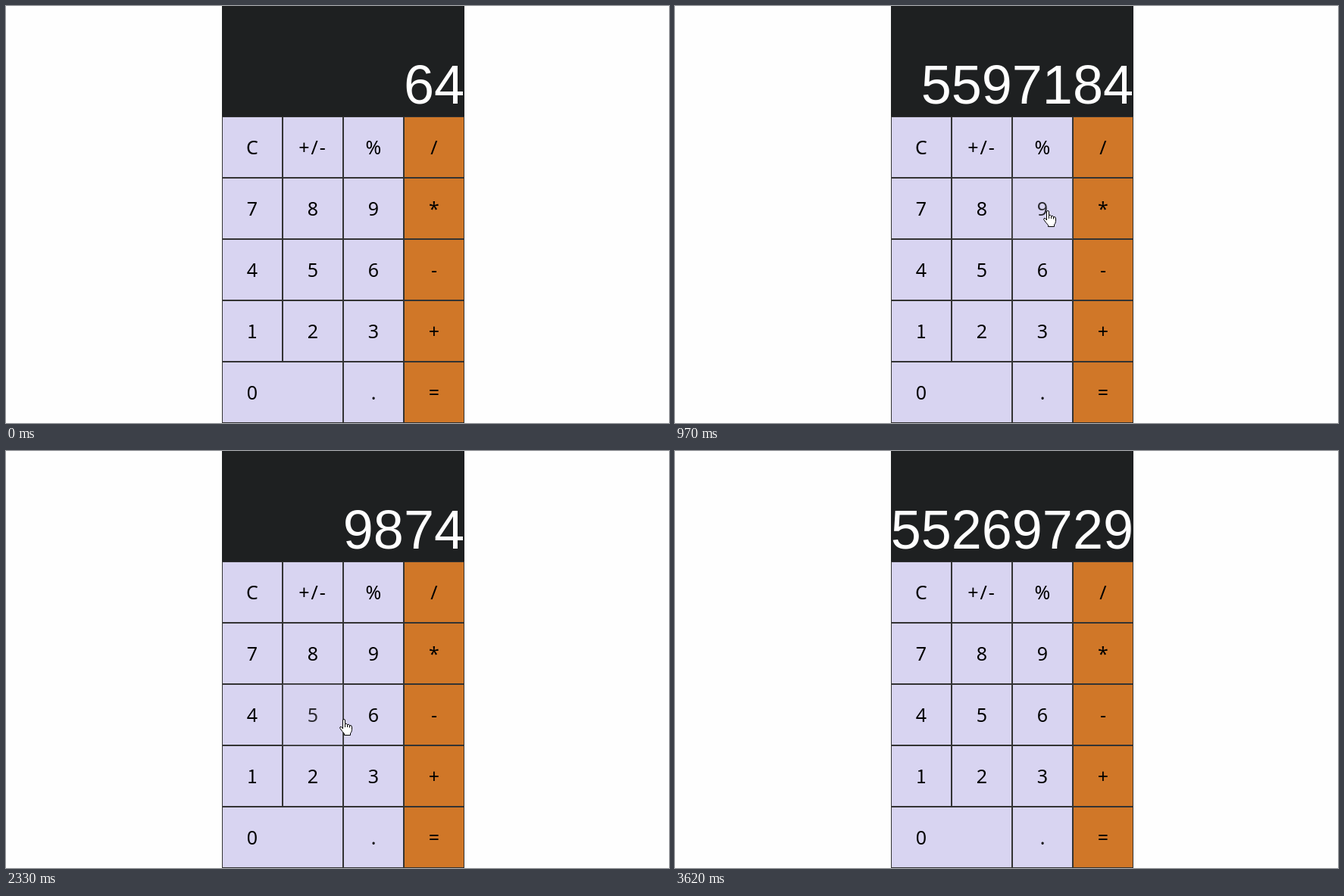
An HTML page with a canvas that plays this animation: 875 by 551 pixels, repeating every 4.12 s.

```html
<!DOCTYPE html>
<html lang="en">
<head>
<meta charset="utf-8">
<title>Calculator</title>
<style>
  html, body { margin: 0; width: 100%; height: 100%; overflow: hidden; background: #fefefe; }
  canvas { display: block; }
</style>
</head>
<body>
<canvas id="stage" width="875" height="551"></canvas>
<script>
const ctx = document.getElementById('stage').getContext('2d');
const LOOP = 4120, LEFT = 285, TOP = 146, CELL_W = 80, CELL_H = 81;
const LAVENDER = '#d8d4f1', ORANGE = '#d07728';

const ROWS = [
  ['C', '+/-', '%', '/'],
  ['7', '8', '9', '*'],
  ['4', '5', '6', '-'],
  ['1', '2', '3', '+'],
  ['0', null, '.', '=']
];

// Each step: start time, then only the properties that change.
const STEPS = [
  [0, { text: '64', hover: '', cursor: null }],
  [270, { hover: '*', cursor: [581, 301] }],
  [420, { cursor: [570, 270] }],
  [550, { cursor: [565, 261] }],
  [700, { text: '5597184', cursor: [507, 268] }],
  [840, { hover: '9', cursor: [490, 269] }],
  [970, { cursor: [486, 270] }],
  [1120, { text: '9' }],
  [1250, { hover: '8', cursor: [382, 271] }],
  [1550, { text: '98' }],
  [1670, { hover: '7', cursor: [322, 286] }],
  [1820, { cursor: [320, 287] }],
  [1940, { text: '987' }],
  [2060, { hover: '4', cursor: [322, 351] }],
  [2200, { text: '9874' }],
  [2330, { hover: '5', cursor: [440, 354] }],
  [2470, { text: '98745', cursor: [456, 355] }],
  [2600, { hover: '6', cursor: [475, 356] }],
  [2890, { text: '987456' }],
  [3010, { hover: '=', cursor: [541, 486] }],
  [3160, { cursor: [561, 509] }],
  [3320, { text: '55269729', cursor: [572, 508] }],
  [3470, { hover: '', cursor: [773, 505], arrow: true }],
  [3620, { cursor: null }]
];

const HAND = new Path2D('M4.5 13V2Q4.5.5 6 .5T7.5 2V6.5Q9.5 5.5 10.5 7.5Q12.5 6.5 13.5 8.5' +
  'Q16.5 8 16.5 11V14.5Q16 18 14.5 19V21.5H6.5V19.5Q4 17 .9 12.5Q.2 10.5 2 10.3Q3.5 11 4.5 13Z');
const KNUCKLES = new Path2D('M7.5 6.5V11M10.5 7.5V11M13.5 8.5V11.5');
const ARROW = new Path2D('M.5.5V16.5L4 13L6.5 18.5L9 17.5L6.5 12H11.5Z');

function stateAt(time) {
  return Object.assign({}, ...STEPS.filter(([start]) => start <= time).map(step => step[1]));
}

function drawKey(label, row, col, hovered) {
  const x = LEFT + col * CELL_W, y = TOP + row * CELL_H;
  const width = label === '0' ? 2 * CELL_W : CELL_W;
  ctx.fillStyle = LAVENDER;
  ctx.fillRect(x, y, width, CELL_H);
  ctx.globalAlpha = hovered ? 0.8 : 1;
  ctx.fillStyle = col === 3 ? ORANGE : LAVENDER;
  ctx.fillRect(x, y, width, CELL_H);
  ctx.strokeStyle = '#333';
  ctx.strokeRect(x + 0.5, y + 0.5, width - 1, CELL_H - 1);
  ctx.fillStyle = '#000';
  ctx.font = label === '1'
    ? '24px "Noto Sans CJK SC", "Noto Sans CJK JP", sans-serif'
    : '25px "Noto Sans", "Open Sans", sans-serif';
  ctx.letterSpacing = label.length > 1 ? '2px' : '0px';
  ctx.textAlign = 'center';
  ctx.fillText(label, x + CELL_W / 2, y + 50);
  ctx.globalAlpha = 1;
}

function drawCursor([x, y], arrow) {
  ctx.save();
  ctx.translate(x, y);
  ctx.fillStyle = '#fff';
  ctx.strokeStyle = '#000';
  ctx.fill(arrow ? ARROW : HAND);
  ctx.stroke(arrow ? ARROW : HAND);
  if (!arrow) ctx.stroke(KNUCKLES);
  ctx.restore();
}

function draw(now) {
  const { text, hover, cursor, arrow } = stateAt(now % LOOP);
  ctx.fillStyle = '#fefefe';
  ctx.fillRect(0, 0, 875, 551);
  ctx.fillStyle = '#1e2021';
  ctx.fillRect(LEFT, 0, 4 * CELL_W, TOP);
  ctx.fillStyle = '#fff';
  ctx.font = '72px "Liberation Sans", Arial, sans-serif';
  ctx.letterSpacing = '0px';
  ctx.textAlign = 'right';
  ctx.fillText(text, LEFT + 4 * CELL_W, 129);
  ROWS.forEach((labels, row) => labels.forEach((label, col) => {
    if (label) drawKey(label, row, col, label === hover);
  }));
  if (cursor) drawCursor(cursor, arrow);
  requestAnimationFrame(draw);
}
requestAnimationFrame(draw);
</script>
</body>
</html>
```
